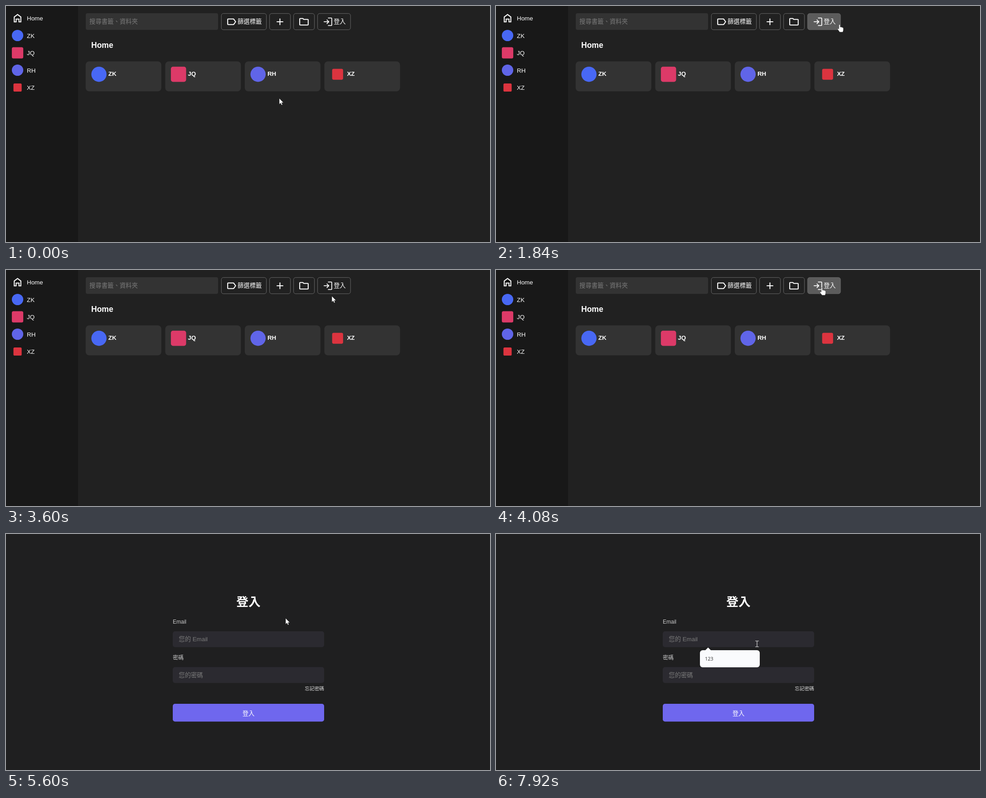
These frames come from a looping animation (1068x524 px, 8000 ms). An HTML page:

```html
<!DOCTYPE html>
<html lang="zh-Hant">
<head>
<meta charset="utf-8">
<title>Bookmarks</title>
<style>
html, body { margin: 0; width: 100%; height: 100%; overflow: hidden; background: #212121; }
svg { display: block; width: 1068px; height: 524px; }
text { font: 13.35px "Liberation Sans", "Noto Sans CJK TC", "Noto Sans CJK", sans-serif; fill: #fff; }
.bold { font-weight: 700; }
.hint { fill: #7b7b7b; }
.icon { fill: none; stroke: #fff; stroke-width: 2; }
.button { fill: #212121; stroke: #696969; }
.button.hover { fill: #5c5c5c; }
.field { fill: #2b2a30; }
</style>
</head>
<body>
<svg viewBox="0 0 1068 524">
  <g id="home">
    <rect width="1068" height="524" fill="#212121"/>
    <rect width="159" height="524" fill="#181818"/>
    <text x="46" y="32">Home</text>
    <rect x="176" y="16" width="292" height="37" rx="4" fill="#333"/>
    <text class="hint" x="184" y="39">搜尋書籤、資料夾</text>
    <rect class="button" x="475.2" y="16.7" width="99.4" height="36" rx="4.5"/>
    <rect class="button" x="581.6" y="16.7" width="46" height="36" rx="4.5"/>
    <rect class="button" x="634.6" y="16.7" width="46" height="36" rx="4.5"/>
    <rect class="button" id="login" x="687.6" y="16.7" width="72.6" height="36" rx="4.5"/>
    <g class="icon">
      <path transform="translate(13 14.5) scale(1.04)" d="M5 9.5 12 4.2 19 9.5V20H15V14H9V20H5Z"/>
      <path transform="translate(485 22.5) scale(1.04)" d="M5 6H16Q16.5 6 16.8 6.4L20.8 12 16.8 17.6Q16.5 18 16 18H5Q4 18 4 17V7Q4 6 5 6Z"/>
      <path transform="translate(592 22.5) scale(1.04)" d="M5 12H19M12 5V19"/>
      <path transform="translate(645 22.5) scale(1.04)" d="M4 5H9.6L11.6 7H20Q21 7 21 8V18Q21 19 20 19H4Q3 19 3 18V6Q3 5 4 5Z"/>
      <path transform="translate(698 22.5) scale(1.04)" stroke-width="1.7" d="M3 12H13.5M9.3 7.6 13.7 12 9.3 16.4M12 4H19Q20 4 20 5V19Q20 20 19 20H12"/>
    </g>
    <text x="511" y="39">篩選標籤</text>
    <text x="723" y="39">登入</text>
    <text class="bold" x="188" y="93" style="font-size:17.5px">Home</text>
    <g id="bookmarks"></g>
  </g>
  <g id="signin">
    <rect width="1068" height="524" fill="#1f1f20"/>
    <text class="bold" x="535" y="160" text-anchor="middle" style="font-size:26.7px">登入</text>
    <text x="368" y="199" style="font-size:12px;fill:#ccc">Email</text>
    <rect class="field" x="368" y="216" width="334" height="35.2" rx="5"/>
    <text class="hint" x="381.3" y="238">您的 Email</text>
    <text x="368" y="278.7" style="font-size:12px;fill:#ccc">密碼</text>
    <rect class="field" x="368" y="295.6" width="334" height="35.2" rx="5"/>
    <text class="hint" x="381.3" y="318">您的密碼</text>
    <text x="702" y="347" text-anchor="end" style="font-size:10.67px;fill:#ddd">忘記密碼</text>
    <rect x="368" y="377" width="334" height="39.5" rx="5" fill="#6f67ee"/>
    <text x="535" y="402.5" text-anchor="middle">登入</text>
    <g id="popup">
      <path d="M461 259 468 252 475 259Z" fill="#fafbfd"/>
      <rect x="450" y="258" width="132" height="38" rx="6" fill="#fafbfd"/>
      <text x="461" y="281" style="font:10.8px 'Open Sans',sans-serif;fill:#333">123</text>
    </g>
  </g>
  <g id="cursor">
    <path id="arrow" fill="#fff" stroke="#111" stroke-width=".5" d="M0 0V13.2L3 10.5 5 15 7.2 14 5.2 9.7H9.3Z"/>
    <path id="hand" fill="#fff" stroke="#222" stroke-width=".6" d="M-1.4 1Q0-1.2 1.4 1V5.8Q3.2 4.7 4 6.2 5.6 5.2 6.4 6.9 8.4 6.6 8.6 8.5V12Q8.4 14 7.2 17H.4L-4.2 10.8Q-4.4 8.6-2.6 9L-1.4 10Z"/>
    <path id="beam" fill="none" stroke="#ddd" stroke-width="1.2" d="M-4-6.5H4M0-6.5V6.5M-4 6.5H4"/>
  </g>
</svg>
<script>
const LOOP = 8000, STEP = 80, SIGNIN_AT = 4640, POPUP_AT = 7760;
const byId = id => document.getElementById(id);

const bookmarks = [
  { label: "ZK", color: "#4868f4", round: true, size: 1 },
  { label: "JQ", color: "#dc3a68", round: false, size: 1 },
  { label: "RH", color: "#6065e8", round: true, size: 1 },
  { label: "XZ", color: "#dc343f", round: false, size: .72 }
];

function badge({ color, round, size }, cx, cy, width) {
  const side = width * size;
  const radius = round ? side / 2 : side * .14;
  return `<rect x="${cx - side / 2}" y="${cy - side / 2}" width="${side}" height="${side}" rx="${radius}" fill="${color}"/>`;
}

byId("bookmarks").innerHTML = bookmarks.map((item, i) => {
  const y = 65.5 + i * 38.5, x = 175.8 + i * 175.55;
  return badge(item, 25.5, y, 25.2) +
    `<text x="46" y="${y + 5}">${item.label}</text>
     <rect x="${x}" y="123" width="167" height="66.5" rx="8" fill="#333"/>` +
    badge(item, x + 29.3, 151.6, 33.6) +
    `<text class="bold" x="${x + 50}" y="155">${item.label}</text>`;
}).join("");

// The pointer eases along each leg; bow is the sideways bulge of its arc.
const origin = { x: 603, y: 205 };
const legs = [
  { from: 0, to: 560, x: 717, y: 47, bow: 0 },
  { from: 960, to: 1840, x: 758, y: 41, bow: -28 },
  { from: 1840, to: 2720, x: 755, y: 25, bow: -40 },
  { from: 2720, to: 3200, x: 719, y: 59, bow: 12 },
  { from: 3520, to: 4080, x: 719, y: 39, bow: 0 },
  { from: 5120, to: 6000, x: 540, y: 300, bow: 0 },
  { from: 6000, to: 6480, x: 615, y: 168, bow: -15 },
  { from: 6480, to: 7040, x: 576, y: 244, bow: -30 }
];

const progress = (t, from, to) => Math.min(1, Math.max(0, (t - from) / (to - from)));
const smooth = k => k * k * (3 - 2 * k);

function pointerAt(t) {
  let { x, y } = origin;
  for (const leg of legs) {
    const k = smooth(progress(t, leg.from, leg.to));
    const dx = leg.x - x, dy = leg.y - y;
    const bulge = leg.bow * Math.sin(Math.PI * k) / Math.hypot(dx, dy);
    x += dx * k - dy * bulge;
    y += dy * k + dx * bulge;
    if (t < leg.to) break;
  }
  return [x, y];
}

const show = (id, on) => byId(id).setAttribute("display", on ? "inline" : "none");
const inside = (x, y, left, top, right, bottom) => x >= left && x <= right && y >= top && y <= bottom;

function render(time) {
  const t = Math.floor((time % LOOP) / STEP) * STEP;
  const [x, y] = pointerAt(t);
  const signin = t >= SIGNIN_AT;
  const overLogin = !signin && inside(x, y, 687, 16, 760, 53);
  const overCard = !signin && y >= 123 && y <= 189.5 && (x - 175.8) % 175.55 <= 167;
  const overField = signin && (inside(x, y, 368, 216, 702, 251) || inside(x, y, 368, 295, 702, 331));
  const hand = overLogin || overCard;

  show("home", !signin);
  show("signin", signin);
  show("popup", t >= POPUP_AT);
  byId("login").classList.toggle("hover", overLogin);
  show("hand", hand);
  show("beam", overField);
  show("arrow", !hand && !overField);
  byId("cursor").setAttribute("transform", `translate(${Math.round(x)} ${Math.round(y)})`);
}

const start = performance.now();
function tick() {
  render(performance.now() - start);
  requestAnimationFrame(tick);
}
tick();
</script>
</body>
</html>
```
